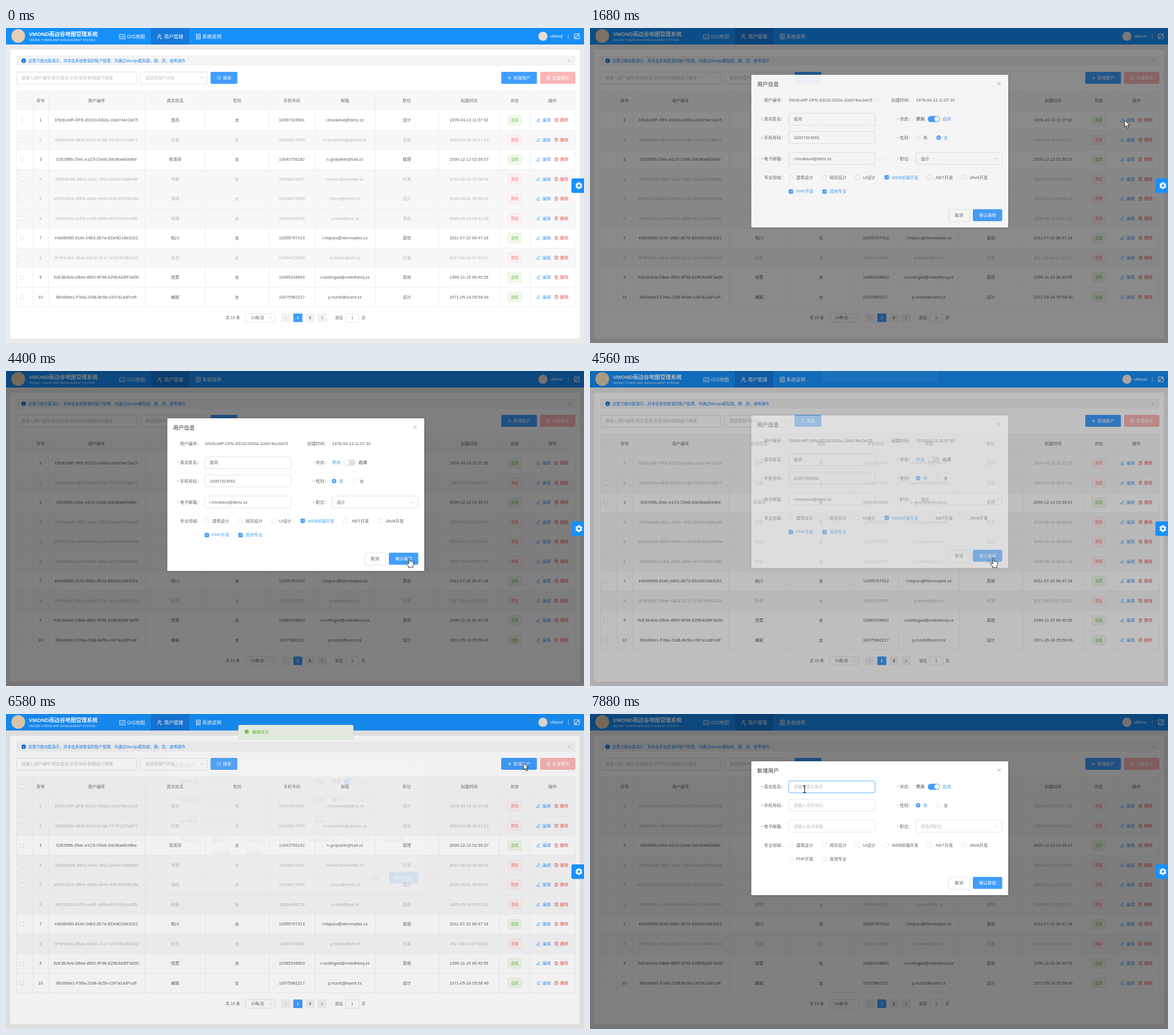
These frames come from a looping animation (1013 by 553 pixels, 8 s). An HTML page with a canvas:

```html
<!DOCTYPE html>
<html lang="zh">
<head>
<meta charset="utf-8">
<title>用户管理</title>
<style>
html, body { margin: 0; width: 100%; height: 100%; overflow: hidden; background: #ebebeb; }
canvas { display: block; width: 1013px; height: 553px; }
</style>
</head>
<body>
<canvas id="stage"></canvas>
<script>
const W = 1013, H = 553, LOOP = 8000;
const FONT = '"Liberation Sans","Noto Sans CJK SC","Noto Sans CJK",sans-serif';
const BLUE = '#409eff', INK = '#606266', PALE = '#b9bcc4', LINE = '#dcdfe6';
const FADE = 280;
const dpr = window.devicePixelRatio || 1;

const stage = document.getElementById('stage');
const layer = document.createElement('canvas');
for (const cv of [stage, layer]) { cv.width = W * dpr; cv.height = H * dpr; }
const main = stage.getContext('2d'), over = layer.getContext('2d');
main.scale(dpr, dpr);
over.scale(dpr, dpr);
let c = main;

const users = [
  ['D9cEcAfF-DFfc-ED1D-D62a-11bb74ec2aC5', '苗岚', '10097324561', 'r.tnvokeud@ibmz.zz', '设计', '1978-04-13 11:07:32', 1],
  ['09bB5b5e-d829-A415-b7aB-f7b7E1C7dAF7', '纪棠', '10028517934', 'm.pvaeblkn@qovtez.zz', '其他', '1994-03-09 06:37:13', 0],
  ['02E3f8fb-29ec-e1C9-C6e8-3dc98aAEe8be', '祝清荷', '10043756182', 'n.gvopskfe@tudl.zz', '管理', '2000-12-12 02:36:37', 1],
  ['2B25Bd3B-85D1-1e6c-7B31-DA810388bdf9', '岑朗', '10058624307', 'f.kvhun@oxtivebr.zz', '开发', '2010-08-03 02:38:04', 0],
  ['aFD32D1b-d5FA-0AbE-ee43-4dfC44FDB2Ae', '邬晴', '10008472695', 't.lvrue@bzimf.zz', '设计', '2005-04-01 05:38:41', 0],
  ['efE3Dd31-ccFD-ee2E-db9b-eC47d91eA2fB', '柏琳', '10064453728', 's.nvob@tlxe.zz', '其他', '2005-09-16 09:31:39', 0],
  ['e9d4B960-81Af-34B3-2E7d-EDe9D16b31E1', '柏川', '10055767413', 'l.rbqozu@henvxoplwi.zz', '其他', '2011-07-22 06:47:18', 1],
  ['9F6FDdb1-56ae-9aCB-2C17-b7e1543B1422', '阮岳', '10064722950', 'q.hdokn@brlf.zz', '开发', '2017-06-03 07:23:22', 0],
  ['6cE3EAeb-DBee-Bf50-9F96-825EADBF3a5D', '饶萱', '10085248663', 'v.luntbrgad@mokdhevq.zz', '其他', '1999-11-15 06:40:55', 1],
  ['9Bc86de1-F36a-22d8-Bc5b-c397a1a3FcdF', '臧峻', '10075982217', 'p.mzolt@kuenf.zz', '设计', '1971-05-18 05:58:46', 1]
];
const heads = ['序号', '用户编号', '真实姓名', '性别', '手机号码', '邮箱', '职位', '创建时间', '状态', '操作'];
const centers = [60.5, 158.5, 296.5, 405, 501, 594, 702.5, 811.5, 891.5, 957.5];
const edges = [18, 47, 74, 243, 349, 461, 541, 647, 758, 864, 918, 997];

// time, x, y, pointer shape from here on
const path = [
  [140, 186, 520, 'arrow'], [910, 968, 182, 'arrow'], [1150, 941, 160, 'hand'],
  [1495, 941, 160, 'arrow'], [1600, 941, 160, 'arrow'], [1680, 937, 162, 'arrow'],
  [2220, 577, 193, 'hand'], [2710, 577, 193, 'arrow'], [2940, 599, 158, 'arrow'],
  [3250, 599, 158, 'hand'], [3560, 599, 158, 'arrow'], [4200, 707, 328, 'hand'],
  [4600, 707, 328, 'arrow'], [4940, 298, 161, 'arrow'], [5240, 298, 161, 'arrow'],
  [5740, 1004, 163, 'arrow'], [6110, 1004, 163, 'arrow'], [6430, 907, 86, 'hand'],
  [6545, 907, 86, 'arrow'], [6640, 907, 86, 'arrow'], [6900, 600, 208, 'arrow'],
  [7320, 376, 132, 'beam']
];

const clamp = x => Math.max(0, Math.min(1, x));
// CSS "ease"
function ease(x) {
  x = clamp(x);
  let a = 0, b = 1;
  for (let i = 0; i < 18; i++) {
    const u = (a + b) / 2, v = 1 - u;
    if (.75 * u * v * (u + v) + u * u * u < x) a = u; else b = u;
  }
  const v = 1 - a;
  return .3 * a * v * v + 3 * a * a * v + a * a * a;
}

function text(s, x, y, color = INK, size = 7.39, align = 'left', weight = '') {
  c.font = `${weight} ${size}px ${FONT}`;
  c.textAlign = align;
  c.fillStyle = color;
  c.fillText(s, x, y + size * .37);
}
const mid = (s, x, y, color, size, weight) => text(s, x, y, color, size, 'center', weight);
function rect(x, y, w, h, color) {
  c.fillStyle = color;
  c.fillRect(x, y, w, h);
}
// bordered boxes sit on the pixel grid so that their lines stay thin
function box(x, y, w, h, fill, border, r = 2, lw = .8) {
  if (border) {
    x = Math.round(x - .5) + .5;
    y = Math.round(y - .5) + .5;
    w = Math.round(w);
    h = Math.round(h);
  }
  c.beginPath();
  c.roundRect(x, y, w, h, r);
  if (fill) { c.fillStyle = fill; c.fill(); }
  if (border) { c.strokeStyle = border; c.lineWidth = lw; c.stroke(); }
}
function disc(x, y, r, fill, border) {
  c.beginPath();
  c.arc(x, y, r, 0, 7);
  if (fill) { c.fillStyle = fill; c.fill(); }
  if (border) { c.strokeStyle = border; c.lineWidth = .7; c.stroke(); }
}
function stroke(d, x, y, color, lw = .8) {
  c.save();
  c.translate(x, y);
  c.strokeStyle = color;
  c.lineWidth = lw;
  c.stroke(new Path2D(d));
  c.restore();
}
const icon = {
  cross: 'M-3-3L3 3M3-3L-3 3',
  down: 'M-2.6-1.3L0 1.3L2.6-1.3',
  left: 'M1.2-2.3L-1.2 0L1.2 2.3',
  right: 'M-1.2-2.3L1.2 0L-1.2 2.3',
  plus: 'M-3 0H3M0-3V3',
  find: 'M2.3-.4A2.6 2.6 0 1 1-2.9-.4A2.6 2.6 0 1 1 2.3-.4M1.5 1.6L3.2 3.2',
  trash: 'M-3-2H3M-1-2V-3.1H1V-2M-2.3-2V3H2.3V-2M-.8-.5V1.6M.8-.5V1.6',
  pen: 'M-2.6 1.2L1-2.9L2.5-1.6L-1 2.4L-2.8 2.7ZM0 3H3.2',
  map: 'M1-3.5H-5V4H5V1M-4 2.5L-1-.5L1.5 2.5M3.4 1C1.4-1 1.4-4 3.4-4S5.4-1 3.4 1Z',
  user: 'M2-1.8A2 2 0 1 1-2-1.8A2 2 0 1 1 2-1.8M-3.7 4C-3.7 0 0 .2 1 .9M1.5 2.4H4M1.5 4H4',
  doc: 'M-3.5-4.3H3.5V4.3H-3.5ZM-2-2H2M-2 0H2M-2 2H2',
  full: 'M-4.3-4.3H4.3V4.3H-4.3ZM.5-2.5H2.5V-.5M2.5-2.5L-2.5 2.5M-2.5.5V2.5H-.5',
  tick: 'M-1.9 0L-.5 1.5L2-1.5'
};

function checkbox(x, y, on) {
  box(x - 3.6, y - 3.6, 7.2, 7.2, on ? BLUE : '#fff', on ? BLUE : LINE, 1, .7);
  if (on) stroke(icon.tick, x, y, '#fff');
}
function input(x, y, w, value, hint, focus) {
  box(x + .4, y - 10.4, w - .8, 20.8, '#fff', focus ? BLUE : LINE);
  text(value || hint, x + 8.5, y, value ? INK : PALE);
}
function button(x, y, w, label, fill, glyph) {
  box(x, y - 10.5, w, 21, fill);
  if (glyph) stroke(icon[glyph], x + 14.5, y, '#fff');
  if (glyph) text(label, x + 21.5, y, '#fff', 7.39, 'left', '500');
  else mid(label, x + w / 2, y, '#fff', 7.39, '500');
}

function header() {
  rect(0, 0, W, 29, '#178ff8');
  rect(254, 0, 67, 29, '#1679db');
  disc(21.5, 14, 12, '#e6cfb4');
  text('VMOND雨边谷地图管理系统', 40, 10.5, '#fff', 9.5, 'left', 'bold');
  text('VMOND YUBIAN MAP MANAGEMENT SYSTEM', 40, 21, '#e4f1ff', 5.28);
  [['map', 204, 'GIS地图', 212], ['user', 269, '用户管理', 277], ['doc', 337, '系统说明', 344]]
    .forEach(([g, x, s, tx]) => {
      stroke(icon[g], x, 15, '#fff', .9);
      text(s, tx, 14.7, '#fff', 8.44);
    });
  disc(941, 14.5, 8, '#e8dcd9');
  text('vMond', 953.5, 14.5, '#fff');
  rect(985, 11, .7, 8, '#cfe6ff');
  stroke(icon.full, 1000.5, 14.5, '#fff', 1);
}

function toolbar() {
  box(18, 48.5, 980, 17.5, '#f4f4f5');
  disc(31, 57.5, 4, '#1677d6');
  mid('i', 31, 57.5, '#fff', 6, 'bold');
  text('这里只做功能演示，并非此系统登录的账户管理，均通过Mockjs模拟增、删、改、查等操作', 39, 57, '#1b84ee', 6.86);
  stroke('M-2-2L2 2M2-2L-2 2', 986.5, 57.5, '#a5a8b0', .7);
  input(18, 87.5, 212, '', '请输入用户编号/真实姓名/手机号码/邮箱进行搜索');
  input(235.5, 87.5, 118, '', '请选择用户状态');
  stroke(icon.down, 343.5, 87.5, '#b4b8c0');
  button(358.5, 87.5, 47, '搜索', BLUE, 'find');
  button(868, 87.5, 62.5, '新增账户', BLUE, 'plus');
  button(936, 87.5, 62, '批量删除', '#fab6b6', 'trash');
}

function table(edited, hover) {
  rect(18, 110, 980, 34.5, '#f8f8f9');
  checkbox(28, 127, false);
  heads.forEach((s, i) => mid(s, centers[i], 127, '#6a6c72', 7.39, '500'));
  users.forEach((u, i) => {
    const y = 161.7 + 34.5 * i, first = edited && i === 0;
    const on = u[6] && !first, ink = on ? INK : '#b5b7bc';
    if (!on) rect(18, y - 17.2, 980, 34.5, '#f8f8f9');
    else if (hover === i) rect(18, y - 17.2, 980, 34.5, '#f4f5fb');
    checkbox(28, y, false);
    [String(i + 1), u[0], u[1], first ? '男' : '女', ...u.slice(2, 6)]
      .forEach((s, k) => mid(s, centers[k], y, ink));
    box(879.4, y - 8.3, 24.2, 16.6, on ? '#f0f9eb' : '#fef0f0', on ? '#e1f3d8' : '#fde2e2');
    mid(on ? '启用' : '禁用', 891.5, y, on ? '#67b83f' : '#f56c6c', 6.34);
    stroke(icon.pen, 933, y, BLUE);
    text('编辑', 940, y, BLUE, 7.39, 'left', '500');
    stroke(icon.trash, 964.5, y, '#f0504c', .7);
    text('删除', 971, y, '#f0504c', 7.39, 'left', '500');
  });
  for (let i = 0; i < 12; i++) {
    rect(edges[i], 110, .8, 380, '#eceef3');
    rect(18, 110 + 34.5 * i - (i > 10 ? .5 : 0), 980, .7, '#eceef3');
  }
}

function pager() {
  const y = 508.7;
  text('共 15 条', 385, y, INK, 6.86);
  box(419.4, 501.5, 52, 14.6, '#fff', LINE);
  mid('10条/页', 441, y, INK, 6.86);
  stroke(icon.down, 464.5, y, PALE, .7);
  [482.5, 503.5, 525, 546].forEach((x, i) => box(x, 501.3, 16, 15, i === 1 ? BLUE : '#f2f2f4', null, 1));
  stroke(icon.left, 490.5, y, PALE, .9);
  mid('1', 511.5, y, '#fff', 6.86, 'bold');
  mid('2', 533, y, INK, 6.86, 'bold');
  stroke(icon.right, 554, y, INK, .9);
  text('前往', 577, y, INK, 6.86);
  box(595.4, 501.5, 23.4, 14.6, '#fff', LINE);
  mid('1', 607, y, INK, 6.86);
  text('页', 623, y, INK, 6.86);
}

function label(s, x, y, need) {
  if (need) text('*', x - 5, y + .8, '#f56c6c');
  text(s + '：', x, y);
}
function radio(x, y, s, on) {
  disc(x, y, 3.6, on ? BLUE : '#fff', on ? BLUE : LINE);
  if (on) disc(x, y, 1.2, '#fff');
  text(s, x + 9, y, on ? BLUE : INK);
}
function toggle(y, p) {
  text('禁用', 571.5, y, p > .5 ? '#303133' : BLUE);
  box(592, y - 5.2, 21, 10.5, '#dcdfe6', null, 5.2);
  c.save();
  c.globalAlpha = p;
  box(592, y - 5.2, 21, 10.5, BLUE, null, 5.2);
  c.restore();
  disc(597.2 + 10.6 * p, y, 4.3, '#fff');
  text('启用', 618, y, p > .5 ? BLUE : '#303133');
}

function dialog(d) {
  const u = d.user, dy = u ? 0 : -33;
  c.save();
  c.shadowColor = 'rgba(0,0,0,.25)';
  c.shadowBlur = 4 * dpr;
  box(282.7, 83, 450.3, 268 + dy, '#fff', null, 1.5);
  c.restore();
  text(u ? '用户信息' : '新增用户', 293, 99.5, '#303133', 9.5);
  stroke(icon.cross, 717, 98.5, '#909399');
  if (u) {
    label('用户编号', 305, 127.3);
    text(u[0], 349, 127.3);
    label('创建时间', 528, 127.3);
    text(u[5], 571.5, 127.3);
  }
  c.save();
  c.translate(0, dy);
  [['真实姓名', 160.4, 1], ['手机号码', 193.3, 2], ['电子邮箱', 230, 3]].forEach(([s, y, k]) => {
    label(s, 305, y, true);
    input(348.5, y, 151.5, u && u[k], '请输入' + s, d.focus && k === 1);
  });
  if (d.caret) rect(357, 156, .7, 9, '#303133');
  label('状态', 543, 160.4, true);
  toggle(160.6, d.on);
  label('性别', 543, 193.3, true);
  radio(575, 193.3, '男', d.male);
  radio(611, 193.3, '女', !d.male);
  label('职位', 543, 230, true);
  input(571.2, 230, 151.5, u && u[4], '请选择职位');
  stroke(icon.down, 713, 230, PALE);
  label('专业领域', 305, 263);
  [['建筑设计', 352.5], ['网页设计', 411], ['UI设计', 469], ['WEB前端开发', 520, 1], ['.NET开发', 595.5],
   ['JAVA开发', 656], ['PHP开发', 352.5, 1, 1], ['其他专业', 411, 1, 1]].forEach(([s, x, on, low]) => {
    const y = low ? 287.7 : 263, ok = u && on;
    checkbox(x, y, ok);
    text(s, x + 9, y, ok ? BLUE : INK);
  });
  box(628.5, 319.2, 36.5, 20.6, '#fff', LINE);
  mid('取消', 646.7, 329.5);
  button(671, 329.5, 51.5, u ? '确认编辑' : '确认新增', BLUE);
  c.restore();
}

function modal(p, d) {
  if (p <= 0) return;
  rect(0, 0, W, H, `rgba(0,0,0,${p * .5})`);
  over.clearRect(0, 0, W, H);
  c = over;
  dialog(d);
  c = main;
  c.globalAlpha = p;
  c.drawImage(layer, 0, -10.5 * (1 - p), W, H);
  c.globalAlpha = 1;
}

function toast(p, shift) {
  if (p <= 0) return;
  c.save();
  c.globalAlpha = p;
  c.translate(0, -25 * (1 - shift));
  box(407.3, 19, 201, 24.5, '#f0f9eb', '#e1f3d8');
  disc(422, 31, 3.5, '#67c23a');
  stroke(icon.tick, 422, 31, '#fff', .8);
  text('编辑成功', 431, 31, '#67c23a');
  c.restore();
}

function gear() {
  box(991, 264, 24, 25.5, '#1890ff', null, 3);
  c.save();
  c.translate(1004, 276.7);
  for (let i = 0; i < 6; i++) {
    c.rotate(Math.PI / 3);
    rect(-1.7, -6, 3.4, 4, '#fff');
  }
  disc(0, 0, 4.6, '#fff');
  disc(0, 0, 2.2, '#1890ff');
  c.restore();
}

function pointerAt(t) {
  if (t < path[0][0]) return null;
  let i = 0;
  while (i < path.length - 1 && path[i + 1][0] <= t) i++;
  const a = path[i], b = path[i + 1] || a;
  const k = clamp((t - a[0]) / (b[0] - a[0] || 1)), e = k * k * (3 - 2 * k);
  return { x: a[1] + (b[1] - a[1]) * e, y: a[2] + (b[2] - a[2]) * e, kind: a[3] };
}
const shapes = {
  arrow: 'M0 0V12L2.8 9.4L4.9 14L6.9 13.1L4.9 8.7H8.6Z',
  hand: 'M-1 1Q0-.6 1.2 1V6Q2.6 5 3.4 6.4Q4.8 5.6 5.6 7Q7.4 6.5 7.6 8.4V11.5L6 14.5V17H-1.5V15L-5 10.2Q-5.2 8.2-3.2 8.8L-1 10.5Z',
  beam: 'M-2.8-6H-.6L0-5.4L.6-6H2.8M0-5.4V5.4M-2.8 6H-.6L0 5.4L.6 6H2.8'
};
function pointer(m) {
  c.save();
  c.translate(m.x, m.y);
  const p = new Path2D(shapes[m.kind]);
  c.lineJoin = 'round';
  c.strokeStyle = '#111';
  c.lineWidth = m.kind === 'beam' ? 1.1 : .9;
  c.fillStyle = '#fff';
  if (m.kind !== 'beam') c.fill(p);
  c.stroke(p);
  c.restore();
}

function draw(t) {
  const m = pointerAt(t);
  const edit = ease((t - 1500) / FADE) * (1 - ease((t - 4480) / FADE));
  const add = ease((t - 6550) / FADE);
  const hover = m && !(t > 1600 && t < 4700) && t < 6600 ? Math.floor((m.y - 144.5) / 34.5) : -1;
  rect(0, 0, W, H, '#ebebeb');
  box(7.5, 38, 998, 507, '#fff', null, 2);
  header();
  toolbar();
  table(t > 4480, hover);
  pager();
  const leave = ease((t - 7360) / 320);
  const shown = ease((t - 4545) / 300) * (1 - leave);
  const shift = ease((t - 4545) / 400) * (1 - leave);
  if (t > 6000) toast(shown, shift);
  if (t < 5000) modal(edit, { user: users[0], male: t >= 2710, on: 1 - ease((t - 3520) / 300) });
  else modal(add, { male: true, on: 1, focus: t >= 7350, caret: t >= 7350 && t < 7880 });
  if (t <= 6000) toast(shown, shift);
  gear();
  if (m) pointer(m);
}

function tick() {
  draw(performance.now() % LOOP);
  requestAnimationFrame(tick);
}
tick();
</script>
</body>
</html>
```
